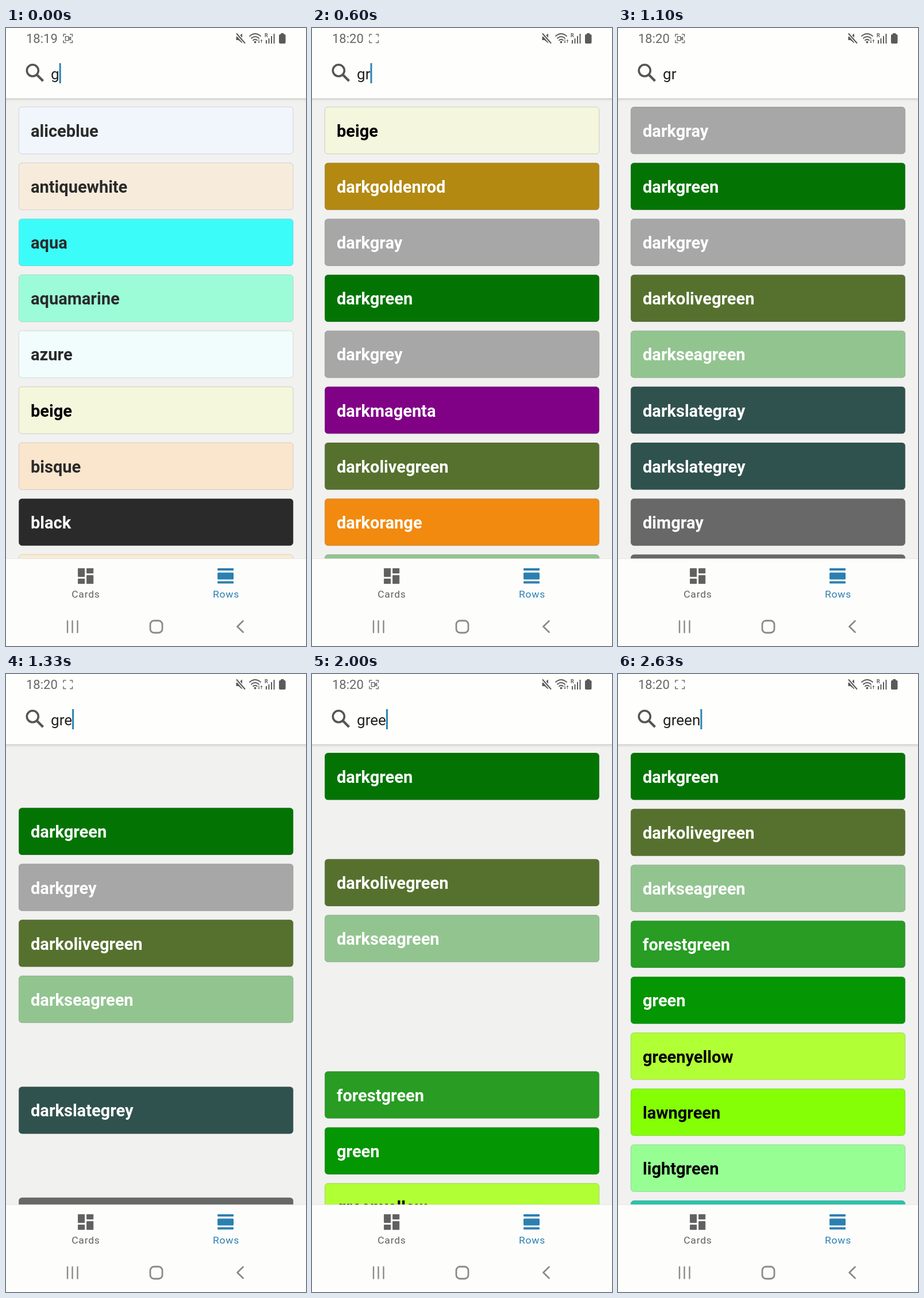
Write an HTML page that moves like this. It is 522 px wide and 1073 px high and loops after 2660 ms.

```html
<!DOCTYPE html>
<html lang="en">
<head>
<meta charset="utf-8">
<title>Colour search</title>
<style>
  html, body { margin: 0; height: 100%; overflow: hidden; background: #f1f1f0; }
  svg { display: block; width: 100vw; height: 100vh; font-family: Roboto, sans-serif; }
  #rows text { font-size: 29px; font-weight: 700; }
  #rows rect { stroke: rgba(0, 0, 0, .16); }
  .tab { font-size: 17.4px; letter-spacing: .8px; text-anchor: middle; }
  .line { fill: none; stroke-linecap: round; stroke-linejoin: round; }
</style>
</head>
<body>
<svg viewBox="0 0 522 1073">
  <defs>
    <linearGradient id="shade" x2="0" y2="1">
      <stop stop-color="#000" stop-opacity=".17"/>
      <stop offset=".4" stop-color="#000" stop-opacity=".06"/>
      <stop offset="1" stop-color="#000" stop-opacity="0"/>
    </linearGradient>
  </defs>
  <rect width="522" height="1073" fill="#f1f1f0"/>
  <g id="rows"></g>

  <!-- status bar and search field -->
  <rect width="522" height="122" fill="#fefefc"/>
  <rect y="122" width="522" height="6" fill="url(#shade)"/>
  <text id="clock" x="35" y="26" font-size="22" fill="#666"></text>
  <g class="line" stroke="#707070" stroke-width="1.6">
    <path d="M100 14.500v-3.500h4M111.500 11h4v3.500M115.500 22v3.500h-4M104 25.500h-4v-3.500"/>
    <path id="camera" d="M103.500 14.800h5.500v7h-5.500zM109 18.300l3.500-2.500v5z"/>
  </g>
  <g fill="#5a5a5a">
    <path d="M400.500 15h4l6.500-5.500v17l-6.500-5.500h-4z"/>
    <path class="line" d="M401.500 10l14 16" stroke="#fefefc" stroke-width="5"/>
    <path class="line" d="M401.500 10l14 16" stroke="#5a5a5a" stroke-width="2"/>
    <g class="line" stroke="#5a5a5a" stroke-width="1.900">
      <path d="M424 14q9.500-8 19 0M427 17.800q6.500-5.500 13 0M430 21.300q3.500-3 7 0"/>
      <path d="M440 20v5.500m-1.500-1.500l1.500 1.500 1.500-1.500M444.500 25.500v-5m-1.500 1.500l1.500-1.500 1.500 1.500" stroke-width="1"/>
    </g>
    <circle cx="433.500" cy="24.500" r="1.900"/>
    <text x="450" y="16" font-size="9" font-weight="700">R</text>
    <path d="M452 21h2v6h-2zM456.500 18h2v9h-2zM461 14h2v13h-2zM465.500 10h2v17h-2z"/>
    <rect x="475" y="11" width="11.500" height="16" rx="2"/>
    <rect x="478" y="9" width="5.500" height="4" rx="1"/>
  </g>
  <g fill="none" stroke="#555">
    <circle cx="46.300" cy="73.800" r="10" stroke-width="3.600"/>
    <path d="M53 80.500l11.500 11.500" stroke-width="4.200"/>
  </g>
  <text id="query" x="78" y="88.500" font-size="26.100" fill="#222"></text>
  <rect id="cursor" y="61" width="3" height="35" fill="#2b84b4"/>

  <!-- tabs and system keys -->
  <rect y="921" width="522" height="152" fill="#e6e6e4"/>
  <rect y="922" width="522" height="151" fill="#fdfdfc"/>
  <g fill="#606060">
    <path transform="translate(120.500 933.400) scale(1.510)" stroke="#606060" stroke-width=".6" stroke-linejoin="round"
      d="M13.300 3.300h7.400v5.400h-7.400zM13.300 11.300h7.400v9.400h-7.400zM3.300 15.300h7.400v5.400h-7.400zM3.300 3.300h7.400v9.400h-7.400z"/>
    <text class="tab" x="138.900" y="989">Cards</text>
  </g>
  <g fill="#2c80b0">
    <rect x="368" y="938" width="28" height="4" rx="1"/>
    <rect x="368" y="945.500" width="28" height="12" rx="1.500"/>
    <rect x="368" y="960.500" width="28" height="4" rx="1"/>
    <text class="tab" x="383" y="989">Rows</text>
  </g>
  <g class="line" stroke="#8a8a8a" stroke-width="2.400">
    <path d="M107 1029.500v20M115.500 1029.500v20M124.500 1029.500v20"/>
    <rect x="251" y="1029" width="21" height="21" rx="6.500" stroke-width="2.800"/>
    <path d="M412.500 1029.500l-10 9.800 10 9.800" stroke-width="2.800"/>
  </g>
</svg>
<script>
const LOOP = 2660, FADE = 120, MOVE = 250, TOP = 136.6, PITCH = 97.15;
const COLORS = {
  aliceblue: '#f1f8ff', antiquewhite: '#f9ebd8', aqua: '#16fffc', aquamarine: '#8affd4',
  azure: '#f1ffff', beige: '#f5f7dd', bisque: '#fce3c6', black: '#000000', blanchedalmond: '#fdebce',
  darkgoldenrod: '#b38911', darkgray: '#a7a7a7', darkgreen: '#037403', darkgrey: '#a7a7a7',
  darkmagenta: '#800086', darkolivegreen: '#56712e', darkorange: '#f28a0e', darkseagreen: '#92c490',
  darkslategray: '#30524e', darkslategrey: '#30524e', dimgray: '#686868', dimgrey: '#686868',
  forestgreen: '#289c23', green: '#049603', greenyellow: '#b1ff35', lawngreen: '#84ff06',
  lightgreen: '#96fe93', lightseagreen: '#2dc2a9'
};
const names = Object.keys(COLORS);
const matching = (query, from) => names.slice(names.indexOf(from)).filter(n => n.includes(query)).slice(0, 9);

// Each filter pass: removed rows fade out, kept rows slide, new rows fade in.
const passes = [
  { start: -Infinity, list: names.slice(0, 9) },
  { start: -32, list: matching('g', 'beige') },
  { start: 595, list: matching('gr', 'darkgray') },
  { start: 1190, list: matching('gre', 'darkgreen') },
  { start: 1829, list: matching('gree', 'darkgreen') }
];
const keys = [-100, 545, 1120, 1745, 2360];

const $ = id => document.getElementById(id);
const ease = x => (1 - Math.cos(Math.PI * Math.min(1, Math.max(0, x)))) / 2;
const show = (el, on) => el.setAttribute('visibility', on ? 'visible' : 'hidden');

const rows = {};
for (const name of names) {
  const light = parseInt(COLORS[name].slice(3, 5), 16) > 220;
  const row = document.createElementNS('http://www.w3.org/2000/svg', 'g');
  row.innerHTML = `<rect x="22.3" y=".5" width="477.400" height="81.500" rx="5.500" fill="${COLORS[name]}"/>
    <text x="43" y="52.300" fill="${light ? '#000' : '#fff'}">${name}</text>`;
  rows[name] = $('rows').appendChild(row);
}

function drawRows(t) {
  const index = passes.findLastIndex(p => p.start <= t);
  const { start, list } = passes[index], before = passes[index - 1].list;
  const gone = ease((t - start) / FADE);
  const moved = ease((t - start - FADE) / MOVE);
  const added = ease((t - start - FADE - MOVE + 10) / FADE);
  for (const name of names) {
    const from = before.indexOf(name), to = list.indexOf(name);
    const alpha = from < 0 ? (to < 0 ? 0 : added) : (to < 0 ? 1 - gone : 1);
    const slot = from < 0 ? to : to < 0 ? from : from + (to - from) * moved;
    show(rows[name], alpha > 0);
    rows[name].setAttribute('opacity', alpha);
    rows[name].setAttribute('transform', `translate(0 ${TOP + slot * PITCH})`);
  }
}

function draw(now) {
  const t = now % LOOP;
  drawRows(t);
  const typed = keys.filter(k => k <= t).length;
  $('query').textContent = 'green'.slice(0, typed);
  $('cursor').setAttribute('x', 78 + $('query').getComputedTextLength());
  show($('cursor'), (t - keys[typed - 1]) % 1000 < 500);
  $('clock').textContent = t < 300 ? '18:19' : '18:20';
  show($('camera'), (t + 200) % 1000 < 500);
  requestAnimationFrame(() => draw(performance.now()));
}
draw(0);
</script>
</body>
</html>
```
